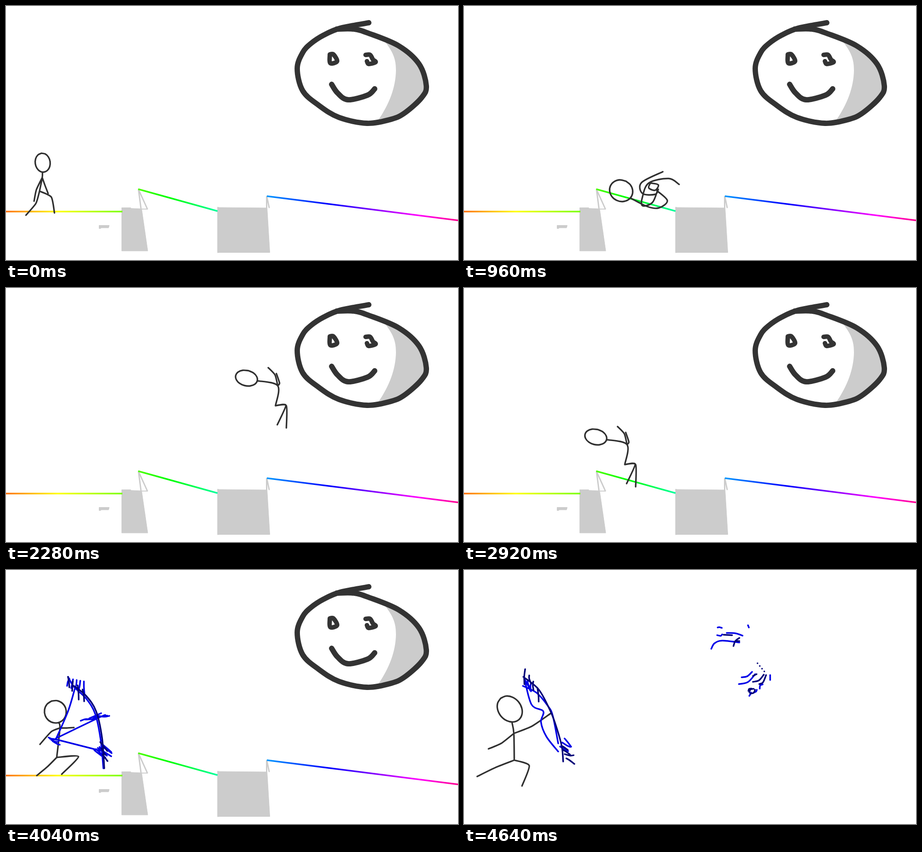
These frames come from a looping animation (998x561 px, 4.68 s). An HTML page:

```html
<!DOCTYPE html>
<html lang="en">
<head>
<meta charset="utf-8">
<title>Stick figure against the giant head</title>
<style>
  html, body { margin: 0; width: 100%; height: 100%; overflow: hidden; background: #fff; }
  svg { display: block; width: 100%; height: 100%; }
  path { fill: none; stroke-linecap: round; stroke-linejoin: round; }
</style>
</head>
<body>
<svg viewBox="0 0 998 561" preserveAspectRatio="none">
  <defs>
    <linearGradient id="hue" gradientUnits="userSpaceOnUse" x1="0" y1="0" x2="998" y2="0">
      <stop offset="0" stop-color="#ff7000"/>
      <stop offset=".115" stop-color="#ff0"/>
      <stop offset=".257" stop-color="#78ff00"/>
      <stop offset=".36" stop-color="#0f0"/>
      <stop offset=".467" stop-color="#00ff9c"/>
      <stop offset=".576" stop-color="#09f"/>
      <stop offset=".715" stop-color="#00f"/>
      <stop offset=".91" stop-color="#f0f"/>
      <stop offset="1" stop-color="#ff0090"/>
    </linearGradient>
  </defs>
  <g id="scene">
    <g fill="#ccc" stroke="#ccc" stroke-linejoin="round">
      <polygon points="255.500,446 299.500,448 313,541 255.500,541"/>
      <polygon points="468,445 576.500,446 582.500,544.500 468,544.500"/>
      <polygon points="205.500,484.500 228,484.500 226.500,490 210,490 209,491.500 205.500,491.500"/>
      <path d="M256 446H275M298 448.500H312" stroke-width="2"/>
      <path d="M292.500 405L298 447M292.500 405L312 448M575.500 421V445M576 421L581 445M468 445V544" stroke-width="3"/>
      <path style="fill:#ccc" stroke="none" d="M837 79C858 106 861 122 861 143C860 180 847 215 822 252L851 250C890 232 926 205 928 175C924 128 890 97 837 75Z"/>
    </g>
    <path d="M0 454H257M292 404.500L467 453M576 420L998 473.500" stroke="url(#hue)" stroke-width="3.500" style="stroke-linecap:butt"/>
    <path id="face" stroke="#333" stroke-width="11.800"/>
    <path id="eyes" stroke="#333" stroke-width="10"/>
  </g>
  <path id="ink" stroke="#2f2f2f" stroke-width="3.400"/>
  <path id="blue" stroke="#0000e8" stroke-width="3.500"/>
  <path id="navy" stroke="#000078" stroke-width="3.500"/>
</svg>
<script>
const LOOP = 4680, STEP = 40;
const el = id => document.getElementById(id);
const mix = (a, b, k) => a + (b - a) * k;
const mixPt = (a, b, k) => [mix(a[0], b[0], k), mix(a[1], b[1], k)];
const clamp = v => Math.max(0, Math.min(1, v));
const rad = deg => deg * Math.PI / 180;
const turn = ([x, y], deg) => {
  const c = Math.cos(rad(deg)), s = Math.sin(rad(deg));
  return [x * c - y * s, x * s + y * c];
};

let seed = 7;
const rnd = () => (seed = seed * 16807 % 2147483647) / 2147483647;

// "x,y x,y / x,y ..." holds strokes divided by slashes.
const strokes = s => s.split('/').map(q => q.trim().split(/\s+/).map(v => v.split(',').map(Number)));

// Smooth stroke through points; a larger bend value gives sharper joints.
function curve(p, bend = 6) {
  let d = 'M' + p[0];
  if (p.length < 2) return d + 'h.1';
  for (let i = 0; i < p.length - 1; i++) {
    const b = p[i], c = p[i + 1], a = p[i - 1] || b, e = p[i + 2] || c;
    const out = b.map((v, j) => v + (c[j] - a[j]) / bend);
    const into = c.map((v, j) => v - (e[j] - b[j]) / bend);
    d += `C${out} ${into} ${c}`;
  }
  return d;
}
const draw = list => list.map(s => curve(s)).join('');

function oval([x, y], [rx, ry], tilt) {
  return Array.from({ length: 13 }, (_, i) => {
    const [dx, dy] = turn([Math.sin(rad(i * 30)) * rx, -Math.cos(rad(i * 30)) * ry], tilt);
    return [x + dx, y + dy];
  });
}

// Loose bent ticks set along the line from a to b.
function ticks(a, b, n, deg, len) {
  return Array.from({ length: n }, (_, i) => {
    const p = mixPt(a, b, i / Math.max(1, n - 1));
    const [dx, dy] = turn([len * (.7 + rnd() * .6), 0], deg + (rnd() - .5) * 30);
    const sag = (rnd() - .5) * 5;
    return [p, [p[0] + dx / 2 + sag, p[1] + dy / 2 + sag], [p[0] + dx, p[1] + dy]];
  });
}

el('face').setAttribute('d', draw(strokes(
  `801,37 738,49 702,64 673,83 655,103 643,138 655,187 690,219 735,246 797,259 851,250 882,235
   918,202 928,176 912,128 867,88 800,60 768,51 730,51 /
   719,173 732,192 755,207 798,197 814,183`)));
el('eyes').setAttribute('d', draw(strokes(
  '715,107 716,126 731,122 723,107 715,107 / 794,108 804,108 810,118 816,124 801,128 797,122')));

// Head centre, radii and tilt; shoulder, hip; then joint and end of two arms and two legs.
const pose = (head, size, tilt, s) => {
  const pts = strokes(s)[0];
  return { head, size, tilt, pts };
};
const walk = pose([81, 346], [16.5, 21], -8,
  '80,379 74,409 67,406 62,431 86,396 93,414 66,436 44,462 100,422 107,457');
const leap = pose([541, 265], [23, 32], 25,
  '519,312 490,361 487,326 450,352 513,349 557,373 475,392 460,423 502,390 491,438');
const crouch = pose([291, 329], [24.5, 17], 14,
  '360,346 355,390 354,322 339,306 364,340 357,319 378,389 359,432 379,390 379,439');
const stand = pose([120, 309], [21, 25], 0,
  '116,350 112,407 103,376 84,400 125,379 145,407 101,431 89,455 119,425 134,456');
const aim = pose([109, 313], [24, 25], -20,
  '119,349 112,414 100,357 75,385 134,349 150,348 92,434 68,454 160,412 123,451');
const loose = pose([101, 307], [25, 31], -40,
  '110,361 111,420 82,383 54,395 150,345 191,317 70,436 29,456 144,432 128,477');

// time, pose, shift x, shift y
const TRACK = [
  [0, walk, 0, 0], [120, walk, 0, 0], [640, walk, 140, -25], [840, leap, -190, 20],
  [1160, walk, 385, 30], [1280, walk, 385, 25], [1520, leap, -25, -50], [1720, leap, 0, 0],
  [1760, leap, 0, 0], [2080, leap, 148, -108], [2280, crouch, 240, -130], [2400, crouch, 235, -128],
  [2920, crouch, 0, 0], [2960, crouch, 0, 0], [3240, crouch, -110, -45], [3480, stand, 0, 0],
  [3760, stand, 0, 0], [3920, aim, 0, 0], [4200, aim, 0, 0], [4320, loose, 0, 0], [LOOP, loose, 0, 0]
];

function figure(t) {
  const i = TRACK.findIndex(r => r[0] > t), a = TRACK[i - 1], b = TRACK[i];
  const k = (t - a[0]) / (b[0] - a[0]);
  const A = a[1], B = b[1], shift = mixPt(a.slice(2), b.slice(2), k);
  const put = (p, q) => mixPt(p, q, k).map((v, j) => v + shift[j]);
  const head = put(A.head, B.head), size = mixPt(A.size, B.size, k);
  const [neck, hip, ...limbs] = A.pts.map((p, n) => put(p, B.pts[n]));
  // While walking, paired limbs trade places.
  const swing = t > 120 && t < 640 ? (1 - Math.cos(k * 6 * Math.PI)) / 2 : 0;
  const limb = n => [n < 4 ? neck : hip, ...[n, n + 1].map(j => mixPt(limbs[j], limbs[j ^ 2], swing))];
  const gap = Math.hypot(neck[0] - head[0], neck[1] - head[1]);
  const chin = mixPt(head, neck, Math.min(1, Math.max(...size) / gap));
  return draw([oval(head, size, mix(A.tilt, B.tilt, k)), [chin, neck, hip]]) +
    [0, 2, 4, 6].map(n => curve(limb(n), 9)).join('');
}

const BALL = [oval([347, 408], [26, 23.5], 25), ...strokes(
  `369,425 405,443 430,446 449,430 426,408 / 411,392 408,402 422,407 429,395 412,391 /
   439,366 392,390 394,414 422,416 429,405 / 475,394 452,381 408,391 394,422 394,441 416,434 428,405`)];

// The tumbling ball of limbs pauses, then rolls on down the ramp.
function rolling(t) {
  const u = t < 960 ? t - 960 : Math.max(0, t - 1000);
  return draw(BALL.map(s => s.map(p => {
    const [x, y] = turn([p[0] - 398, p[1] - 410], u * .9);
    return [398 + x + u * .27, 410 + y + u * .07];
  })));
}

const drawnBow = {
  blue: [...strokes(
    `137,236 150,258 177,284 197,318 209,375 215,438 / 152,262 137,312 110,374 /
     110,374 216,401 / 110,372 201,328 219,320`),
    ...ticks([140, 240], [172, 246], 5, 95, 24), ...ticks([165, 333], [203, 322], 5, -12, 24),
    ...ticks([94, 370], [103, 378], 4, 20, 17), ...ticks([195, 398], [214, 386], 6, 45, 28)],
  navy: [...strokes('150,256 177,278 199,312 212,370 217,438'),
    ...ticks([137, 236], [169, 264], 4, 82, 26), ...ticks([208, 380], [213, 408], 3, 55, 20)]
};
const looseBow = {
  blue: [...strokes(
    `130,256 160,271 185,300 196,322 208,383 /
     133,238 149,297 175,312 170,336 182,368 208,401`),
    ...ticks([133, 240], [148, 250], 3, 75, 24), ...ticks([212, 390], [222, 372], 3, 40, 19)],
  navy: [...strokes('131,236 165,264 191,312 205,350 216,390 219,423'),
    ...ticks([135, 219], [162, 260], 4, 85, 27), ...ticks([215, 388], [226, 416], 4, 22, 20)]
};

// Quarter sweep: level at the left, rising at the right.
const sweep = (x, y, w, h) => [[x, y], [x + w * .55, y - h * .2], [x + w, y - h]];
const burst = {
  blue: [...strokes('546,174 553,162 570,156 608,160 / 580,139 600,140 615,145'),
    sweep(613, 237, 23, 12), sweep(607, 252, 36, 22),
    ...ticks([559, 144], [560, 127], 2, 0, 9), [[627, 122], [629, 127]], [[676, 232], [676, 243]],
    ...ticks([630, 278], [653, 262], 3, -55, 10)],
  navy: [...strokes('573,143 592,144 / 595,168 599,157 608,150 / 599,157 608,157'),
    sweep(638, 247, 24, 16), sweep(652, 252, 15, 20), [[638, 234], [646, 230]],
    ...ticks([628, 267], [632, 273], 3, -50, 11),
    ...Array.from({ length: 4 }, (_, i) => [[648 + i * 5, 206 + i * 6]])]
};

function weapon(t, tint) {
  if (t < 3760) return '';
  if (t < 4200) {
    const list = drawnBow[tint];
    return draw(list.slice(0, Math.ceil(list.length * clamp((t - 3720) / 280))));
  }
  const bow = draw(looseBow[tint]);
  if (t < 4400) {
    const [x, y] = mixPt([200, 326], [600, 184], (t - 4180) / 220);
    const shaft = [[x - 85, y + 32], [x, y]], vane = [[x - 90, y + 25], [x - 70, y + 27]];
    return bow + curve(tint === 'blue' ? shaft : vane);
  }
  const k = clamp((t - 4360) / 200);
  return bow + draw(burst[tint].map(s => s.map(p => mixPt([622, 190], p, k))));
}

const start = performance.now();
function frame() {
  const t = Math.floor(((performance.now() - start) % LOOP) / STEP) * STEP;
  el('ink').setAttribute('d', t >= 840 && t < 1160 ? rolling(t) : figure(t));
  for (const tint of ['blue', 'navy']) el(tint).setAttribute('d', weapon(t, tint));
  el('scene').style.display = t < 4640 ? '' : 'none';
  requestAnimationFrame(frame);
}
frame();
</script>
</body>
</html>
```
